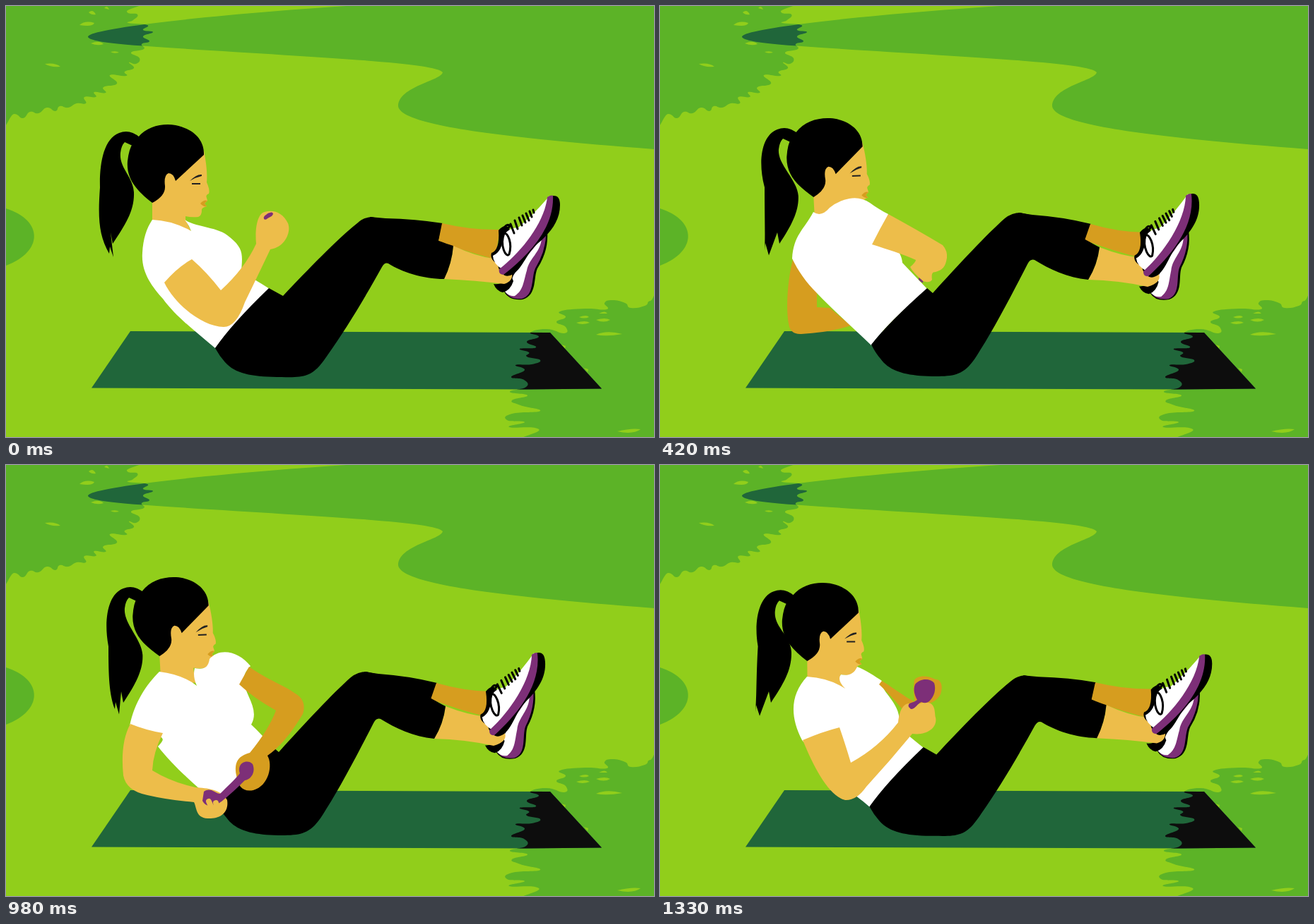
Recreate the animation shown at these times as an HTML page. Size 917x611 px, loop 1.4 s.

```html
<!DOCTYPE html>
<html lang="en">
<head>
<meta charset="utf-8">
<title>Seated twist</title>
<style>
html, body { margin: 0; height: 100%; overflow: hidden; background: #91ce1b }
svg { display: block; width: 100vw; height: 100vh }
.leaf { fill: #5cb327 } .grass { fill: #91ce1b } .mat { fill: #20663a }
.skin { fill: #edbd4a } .shade { fill: #d69d1f } .plum { fill: #7d2f78 } .white { fill: #fff }
.line { fill: none; stroke: #000; stroke-width: 3; stroke-linecap: round }
</style>
</head>
<body>
<svg viewBox="0 0 917 611" preserveAspectRatio="none">
  <defs>
    <clipPath id="treeClip"><path class="treeShape"/></clipPath>
    <clipPath id="bushClip"><path class="bushShape"/></clipPath>
    <path id="lawn" d="M482 0C380 6 200 22 140 35Q115 40 116 44Q120 52 200 57C400 71 610 79 618 94C616 106 555 114 555 142C558 170 710 187 917 203V0Z"/>
    <path id="rug" d="M176 461L770 463L843 542.500L735 543.500L121 541.500Z"/>
  </defs>
  <path class="leaf treeShape"/>
  <use href="#lawn" class="leaf"/>
  <use href="#lawn" class="mat" clip-path="url(#treeClip)"/>
  <path class="leaf" d="M0 287C53 304 53 348 0 368Z"/>
  <path class="leaf bushShape"/>
  <path class="grass" d="M55 82Q70 80 77 86Q62 87 55 82ZM104 27Q112 20 125 24Q123 30 104 27ZM117 9Q123 4 127 12Q121 13 117 9ZM120 53Q132 48 138 54Q130 57 120 53ZM148 65Q156 63 160 66Q152 68 148 65ZM139 3Q143 -2 146 5Z"/>
  <path class="grass" d="M811 441Q822 437 825 441Q818 444 811 441ZM807 449Q820 445 826 449Q815 453 807 449ZM835 445Q848 441 855 445Q846 450 835 445ZM835 466Q850 459 872 465Q850 469 835 466ZM839 436Q848 431 851 436ZM865 603Q885 598 898 600Q887 608 865 603ZM786 480L792 482L791 486ZM818 513L824 515L823 519Z"/>
  <use href="#rug" class="mat"/>
  <use href="#rug" fill="#0d0d0d" clip-path="url(#bushClip)"/>

  <path id="back" class="shade"/>
  <path id="pony"/>
  <g id="head">
    <path class="skin" d="M280 205C284 225 285 240 284 250Q289 261 287 266Q282 268 284 272L285 276L281 280L284 284Q276 286 277 290Q277 297 272 299Q262 300 254 298L254 303L262 320Q235 318 207 306V270L220 220Z"/>
    <path class="shade" d="M275 280Q280 274 285 276L281 280L284 284Q279 285 275 280Z"/>
    <path d="M187 186C200 170 222 166 240 169C265 174 281 190 280 211L240 248Q237 237 230 237Q223 240 225 255Q226 269 207 279C185 262 170 245 172 220Q174 202 180 194Z"/>
    <path d="M260 248Q270 238 277 239L277 241Q268 243 260 248ZM263 251H275V253H263Z" fill="#222"/>
  </g>
  <path id="shirt" class="white"/>
  <path id="farLeg"/>
  <path id="farShin" class="shade"/>
  <g class="shoe">
    <path d="M766 320Q768 347 752 372C746 385 752 410 731 416Q712 418 705 405L716 380Z"/>
    <path class="plum" d="M764 320Q765 346 749 372C743 386 748 410 730 415Q712 416 707 405L738 350Z"/>
    <path class="white" d="M758 330C756 350 740 358 737 375C732 392 732 403 720 411Q712 412 706 405Q713 396 718 382L738 350Z"/>
    <path d="M690 394Q706 396 714 380L718 390Q714 403 703 406Q694 404 690 394Z"/>
  </g>
  <path id="nearShin" class="skin"/>
  <path id="pants"/>
  <g class="shoe">
    <path d="M697 318Q706 308 712 315L716 330L712 378L703 380Q697 376 696 366Q684 359 687 350Q699 346 697 318Z"/>
    <path class="white" d="M704 324Q716 312 724 315C740 301 757 284 769 269L774 274C765 310 740 345 703 374Q689 365 689 354Q703 348 704 324Z"/>
    <path class="plum" d="M766 271Q775 265 778 274C776 312 742 357 706 381Q696 381 698 373C728 350 762 308 766 271Z"/>
    <path d="M774 269Q784 268 784 282C784 305 770 322 752 337C737 350 732 370 718 380Q709 385 704 381C740 353 776 315 774 269Z"/>
    <path class="line" d="M701 322Q708 306 713 312Q708 318 705 322C698 340 708 358 712 352C717 336 710 322 705 322M714 309L719 322M720 304L724 316M726 300L730 311M731 297L735 307M736 294L740 304M741 291L744 299M746 289L747 293"/>
  </g>
  <path id="far" class="shade"/>
  <path id="near" class="skin"/>
  <path id="weight" class="plum"/>
  <path id="fingers" d="M291 486L287 477M300 490L297 479" fill="none" stroke="#edbd4a" stroke-width="8" stroke-linecap="round"/>
</svg>
<script>
const $ = id => document.getElementById(id);

// Closed, rounded Catmull-Rom outline through x,y pairs
function outline(nums) {
  const pts = [];
  for (let i = 0; i < nums.length; i += 2) pts.push([nums[i], nums[i + 1]]);
  const at = i => pts[(i + pts.length) % pts.length];
  return `M${pts[0]}` + pts.map((p, i) => {
    const a = at(i - 1), q = at(i + 1), b = at(i + 2);
    return `C${[0, 1].map(j => p[j] + (q[j] - a[j]) / 4)} ${[0, 1].map(j => q[j] - (b[j] - p[j]) / 4)} ${q}`;
  }).join('') + 'Z';
}
const foliage = {
  tree: [-9, -9, 178, -9, 171, 8, 186, 12, 180, 20, 173, 24, 200, 27, 194, 34, 208, 37, 194, 43, 203, 50, 192, 54,
    195, 61, 177, 66, 189, 74, 184, 82, 174, 80, 181, 88, 168, 93, 170, 99, 147, 98, 157, 110, 138, 115, 141, 123,
    125, 122, 127, 129, 111, 129, 113, 138, 100, 138, 88, 144, 76, 142, 70, 149, 58, 144, 46, 152, 34, 150, 24, 159, 12, 153, -9, 154],
  bush: [930, 420, 912, 418, 904, 425, 884, 428, 876, 421, 858, 417, 847, 421, 850, 430, 820, 429, 784, 433, 792, 441,
    779, 448, 792, 455, 790, 464, 765, 458, 742, 463, 754, 469, 737, 476, 750, 484, 727, 486, 740, 491, 737, 497,
    756, 502, 744, 508, 721, 509, 734, 516, 715, 526, 733, 530, 736, 540, 713, 547, 738, 552, 716, 559, 728, 566,
    756, 574, 716, 578, 709, 587, 734, 590, 712, 597, 754, 600, 742, 620, 930, 620],
};
for (const name in foliage)
  for (const el of document.querySelectorAll(`.${name}Shape`)) el.setAttribute('d', outline(foliage[name]));

// Blends every number of two equally built strings
function mix(a, b, t) {
  const to = b.match(/[\d.]+/g);
  let i = 0;
  return a.replace(/[\d.]+/g, n => (+n + (to[i++] - n) * t).toFixed(2));
}

// Lower body: upright and leaning
const legs = {
  pants: ['M372 400L392 411C428 373 468 331 497 308Q505 300 517 299L532 302C570 315 610 333 633 340Q631 365 620 387C590 387 560 377 541 365Q536 363 532 370C510 410 480 460 455 495C435 525 425 527 390 526C350 526 325 522 310 505Q302 496 296 485Q320 450 372 400Z',
    'M378 400L386 407C423 366 463 323 488 301Q498 293 510 293L523 296C565 310 600 330 622 342Q619 367 606 388C576 385 551 373 530 360Q524 358 520 366C500 405 474 455 453 488C432 524 420 525 385 525C347 524 325 518 312 500Q305 492 299 480Q325 447 378 400Z'],
  farLeg: ['M515 299L537 301Q580 302 618 308L612 334L520 330Z', 'M507 293L527 296Q570 299 610 309L602 333L512 325Z'],
  farShin: ['M617 308Q660 318 699 317L692 359Q640 345 612 333Z', 'M609 309Q650 321 688 321L684 358Q640 347 601 332Z'],
  nearShin: ['M633 340Q665 355 690 358L716 378Q718 390 705 394Q665 389 620 387Q631 365 633 340Z',
    'M622 342Q655 355 682 357L706 380Q710 392 690 398Q650 389 606 388Q619 367 622 342Z'],
};

const backHidden = 'M235 400C238 415 245 425 250 435Q260 445 272 445Q275 440 280 440L270 430L250 420L240 410Z';
const farHidden = 'M368 320C370 325 375 330 380 330Q385 330 387 328Q390 322 390 315C388 308 385 304 380 304C375 302 368 304 366 310C364 315 364 318 366 320Q366 322 367 322Q367 321 368 320Z';
const twistShirt = 'M217 293Q250 297 270 313Q264 300 267 288C280 290 286 288 288 275C302 258 330 264 346 285C318 312 364 338 347 368Q360 380 379 402Q325 445 300 481C268 455 235 425 215 399C228 384 226 388 175 370C182 335 200 310 217 293Z';

// Upper body poses; hair is [left edge, tip]
const center = {
  hair: '131 152', back: backHidden, far: farHidden,
  shirt: 'M207 303Q235 304 262 319Q259 311 253 303C262 309 275 311 285 314C298 317 308 320 317 328C338 345 334 355 333 378Q350 386 373 401Q330 440 296 485C270 463 240 440 222 415C207 398 191 378 193 350C194 330 199 315 207 303Z',
  near: 'M224 392Q243 370 263 359Q284 377 304 403Q338 372 354 337C352 315 356 294 366 292C380 288 392 294 399 308C404 320 395 342 374 345Q355 385 338 420Q326 455 308 455C280 455 240 425 224 392Z',
  weight: 'M365 301C364 300 366 297 368 296C370 294 372 293 374 293C376 292 378 293 378 295C377 297 376 298 374 299C372 300 370 301 369 302C368 303 366 303 365 302Z',
};
const awayHalf = {
  hair: '134 156', far: farHidden,
  back: 'M222 415C228 430 235 440 240 450Q250 462 265 458Q270 455 280 450L270 440L250 430L240 420Z',
  shirt: 'M211 299Q230 305 242 299Q248 297 255 296C262 296 270 298 275 304C283 310 290 316 297 318C310 345 330 370 362 386Q368 393 375 401Q330 440 297 483C265 455 240 437 222 417C205 398 194 375 196 350C197 330 203 315 211 299Z',
  near: 'M275 363Q283 335 297 318Q330 335 366 342Q370 335 369 325C363 305 366 294 376 296C395 290 402 295 404 312C404 330 393 335 392 343Q393 360 391 372Q385 387 366 386C340 380 300 370 275 363Z',
  weight: 'M376 296C377 295 378 295 379 295C380 295 382 295 383 295C384 295 385 295 385 296C384 297 383 297 382 297C381 297 380 298 379 298C378 298 377 297 376 296Z',
};
const away = {
  hair: '149 154', far: farHidden,
  back: 'M190 352C180 385 178 430 182 450Q184 466 200 465Q240 463 270 453L240 428L222 427L222 405Z',
  shirt: 'M217 292Q228 300 240 286Q252 276 268 273C278 271 288 273 297 279C305 285 315 291 323 295C310 330 342 340 343 364Q360 382 379 402Q325 445 299 481C275 458 245 431 222 407C207 392 195 375 187 358C189 325 203 318 217 292Z',
  near: 'M300 338Q311 316 323 295Q365 318 400 339Q407 347 406 357C404 370 400 374 390 377C385 377 384 380 385 388C382 393 376 391 372 390Q358 378 354 370Q362 363 362 360C342 351 322 345 300 338Z',
  weight: 'M366 385C367 386 368 386 369 387C370 388 371 389 372 390C373 391 372 393 371 392C370 391 369 391 368 390C367 389 366 388 366 387C366 386 366 386 366 385Z',
};
const towardStart = {
  hair: '132 147', back: backHidden,
  shirt: 'M208 300Q240 300 262 318Q250 305 256 297C264 298 274 298 276 294C284 300 290 306 297 309C325 318 337 340 337 372Q352 384 373 401Q330 440 297 485C270 460 240 440 215 410C204 392 193 375 194 350C195 330 200 315 208 300Z',
  near: 'M201 371Q232 361 254 366Q255 395 258 417Q305 408 336 374C336 348 350 343 362 342C384 338 384 345 383 355C393 362 378 388 357 383Q320 425 285 448Q262 473 243 471C222 465 203 415 201 371Z',
  far: 'M362 345C368 350 375 352 380 348Q385 345 385 342Q390 335 397 325C399 305 390 297 385 300C370 292 358 300 357 310C355 325 355 335 360 342Q362 344 363 346Q362 346 361 346Z',
  weight: 'M356 350C354 345 362 348 364 338C368 330 360 325 363 308C370 300 380 304 386 310C390 320 385 328 384 338C378 342 378 350 375 354C372 354 370 344 364 350Z',
};
const toward = {
  hair: '146 160', back: backHidden, shirt: twistShirt,
  near: 'M176 367Q198 376 222 380Q208 408 207 433Q235 450 268 457C285 458 305 460 313 475C316 495 300 502 285 501C268 500 270 485 266 478Q230 475 200 468Q170 462 166 440C163 410 166 385 176 367Z',
  far: 'M344 286C370 305 395 312 415 328Q425 338 420 353Q395 395 370 412C378 425 372 455 350 461C335 464 328 455 326 440C322 420 330 412 345 408Q372 375 382 348Q350 330 330 311Z',
  weight: 'M280 463C290 456 296 466 303 466C314 455 324 446 331 437C326 422 342 416 349 424C354 436 346 446 338 447C328 457 316 468 305 477C298 482 284 488 278 476Z',
};
const towardLate = {
  hair: '149 154', back: backHidden, shirt: twistShirt,
  near: 'M176 370Q198 379 222 383Q210 412 209 437Q240 455 270 460C285 462 300 470 308 487C305 510 295 511 285 508C262 500 262 490 264 480Q230 480 195 463Q173 455 172 435C169 408 171 390 176 370Z',
  far: 'M347 285C370 305 395 315 412 330Q421 340 416 357Q395 395 367 420C372 440 368 462 350 474C335 475 328 465 322 445C320 432 330 428 352 413Q372 382 379 350Q350 332 328 311Z',
  weight: 'M275 472C288 464 292 474 300 476C312 467 320 460 329 451C322 434 338 430 342 438C354 446 346 460 336 461C326 469 314 480 304 487C294 492 272 498 273 486Z',
};
const towardEnd = {
  hair: '137 141', back: backHidden,
  shirt: 'M208 300Q240 302 262 317Q250 305 256 297C264 299 274 298 279 286C290 290 305 300 314 306C310 322 345 338 338 372Q352 384 373 401Q330 440 297 485C275 465 240 445 222 415C212 400 205 395 201 390C183 355 185 325 208 300Z',
  near: 'M202 390Q230 378 254 372Q262 395 270 422Q310 400 337 365C340 338 350 335 362 340C392 328 388 350 390 358C393 372 378 384 357 381Q325 420 292 456Q278 476 262 475C240 470 218 430 202 390Z',
  far: 'M314 306C325 313 338 322 350 330Q360 336 372 340Q390 338 397 325C402 310 395 303 390 304C375 296 362 300 360 305C357 325 362 335 360 338Q350 345 342 345Q325 325 310 311Z',
  weight: 'M352 343C350 336 358 338 364 333C360 326 358 318 361 311C368 302 382 302 388 309C391 318 388 328 382 334C378 338 374 338 370 336C364 338 362 346 355 346Z',
};

const keys = [[0, center], [2, awayHalf], [4, away], [6, away], [8, awayHalf], [10, center], [11, towardStart],
  [14, toward], [16, towardLate], [19, towardEnd], [20, center]];
const lean = [0, .13, .38, .75, 1, 1, 1, .75, .38, .13];

function ponytail(p, left, tip) {
  const x = 6 * p, y = -5 * p, right = 181 + (left - 131) * .82, notch = left + 20;
  return `M${189 + x} ${186 + y}Q${175 + x} ${174 + y} ${160 + x} ${180 + y}C${138 + x} ${188 + y} ${132 + x} ${225 + y} ${left + 2 - 3 * p} 257
    C${left - 1} 300 ${left} 325 ${tip - 6} ${351 + y}L${tip - 5} ${341 + y}L${tip} ${356 + y / 2}L${notch - 3} 321L${notch} 337
    C${notch + 18} 310 ${right + 1} 290 ${right} ${264 - y}C${right - 2} ${240 - y} ${160 + x} ${230 + y} ${162 + x} ${208 + y}Q${163 + x} ${198 + y} ${168 + x} ${193 + y}L${181 + x} ${199 + y}Z`;
}

function draw() {
  const step = Math.floor(performance.now() / 70) % 20;
  const p = lean[step % 10];
  const i = keys.findIndex(([at]) => at > step);
  const [from, a] = keys[i - 1], [to, b] = keys[i];
  const u = (step - from) / (to - from), t = u * u * (3 - 2 * u);

  for (const id in legs) $(id).setAttribute('d', mix(...legs[id], p));
  for (const id of ['back', 'shirt', 'far', 'near', 'weight']) $(id).setAttribute('d', mix(a[id], b[id], t));
  $('pony').setAttribute('d', ponytail(p, ...mix(a.hair, b.hair, t).split(' ').map(Number)));
  $('head').setAttribute('transform', `translate(${8 * p} ${-9.5 * p}) rotate(${-3 * p} 235 235)`);
  for (const shoe of document.querySelectorAll('.shoe'))
    shoe.setAttribute('transform', `translate(${-16 * p} 0) rotate(${-4.5 * p} 735 345)`);
  $('far').style.display = step > 10 ? '' : 'none';
  $('fingers').style.display = step > 13 && step < 17 ? '' : 'none';
  requestAnimationFrame(draw);
}
draw();
</script>
</body>
</html>
```
